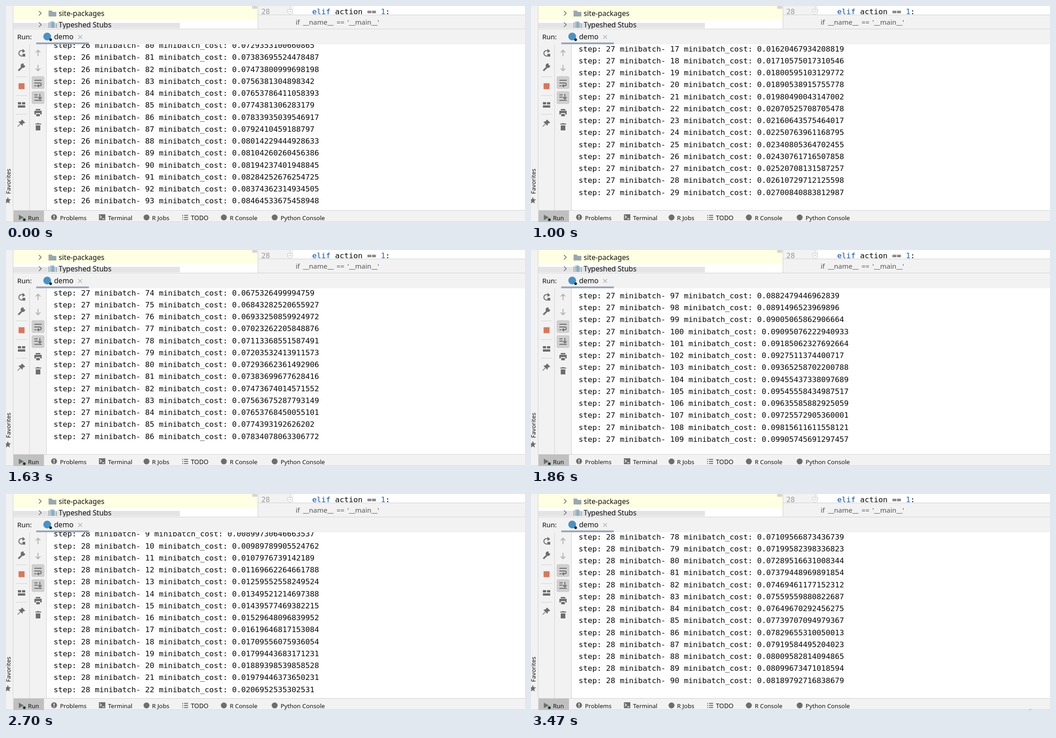
Recreate the animation shown at these times as an HTML page. Size 1134 by 474 pixels, loop 3.64 s.

```html
<!DOCTYPE html>
<html lang="en">
<head>
<meta charset="utf-8">
<title>Run console</title>
<style>
html, body { margin: 0; width: 100%; height: 100%; overflow: hidden; background: #f2f2f2; }
svg { display: block; }
text { font-family: "Noto Sans", "Open Sans", sans-serif; font-size: 15.65px; fill: #111; }
.mono text, text.mono { font-family: "DejaVu Sans Mono", monospace; font-size: 16.61px; fill: #080808; }
.small text { font-size: 13px; }
.line { fill: none; stroke: #6e6e6e; stroke-width: 2; }
.rule { stroke: #d1d1d1; fill: none; }
.icon { fill: #6e6e6e; }
</style>
</head>
<body>
<svg width="1134" height="474" viewBox="0 0 1134 474">
  <defs><clipPath id="pane"><rect x="89" y="84" width="1045" height="364"/></clipPath></defs>
  <rect width="1134" height="474" fill="#f2f2f2"/>

  <!-- project tree -->
  <rect x="16" width="534" height="50" fill="#fff"/>
  <rect x="16" width="534" height="31" fill="#ffffe4"/>
  <rect x="16" y="37" width="364" height="12" fill="#e4e4e4"/>
  <rect x="538" y="-4" width="11" height="10" fill="#d6d6d0"/>
  <path class="line" d="M72 11l5 5-5 5M72 36l5 5-5 5" style="stroke-width:1.6"/>
  <path fill="#9aa7b0" d="M93 10h7l2 3h8v10H93z"/>
  <path fill="#9aa7b0" d="M93 36h2v12h-2zM97 34h3v14h-3zM105 36h2v12h-2zM109 38h2v10h-2z"/>
  <path fill="#5a9fc4" d="M101 34h3v14h-3z"/>
  <text x="115" y="22">site-packages</text>
  <text x="115" y="47">Typeshed Stubs</text>

  <!-- editor -->
  <rect x="627" width="507" height="20" fill="#fff"/>
  <path class="rule" d="M550.5 0V50M620.5 0V20M551 19.5H1134"/>
  <path fill="#fff" stroke="#c4c4c4" d="M615.5 7.5h10v7l-5 4-5-4z"/>
  <path stroke="#aaa" d="M618 12.5h5"/>
  <text class="mono" x="558" y="18" style="fill:#999;font-size:15.5px">28</text>
  <text class="mono" x="669" y="18"><tspan fill="#0b4fae">elif</tspan> action == <tspan fill="#1763d6">1</tspan>:</text>
  <text x="633" y="41" style="fill:#555;font-size:15px;word-spacing:2.8px">if __name__ == '__main__'</text>

  <!-- run header -->
  <path class="rule" d="M16 50.5H1134"/>
  <text x="24.5" y="73" style="font-size:15px">Run:</text>
  <circle cx="90" cy="67" r="8.5" fill="#4b92c4"/>
  <circle cx="97.5" cy="74" r="3" fill="#17301c"/>
  <text x="105" y="73">demo</text>
  <path stroke="#aaa" stroke-width="1.3" d="M158 64l8 8M166 64l-8 8"/>
  <rect x="66" y="80" width="115" height="4" fill="#9ca7b8"/>

  <!-- console -->
  <rect x="89" y="84" width="1045" height="364" fill="#fff"/>
  <g id="log" class="mono" clip-path="url(#pane)"></g>

  <!-- tool buttons -->
  <path class="rule" d="M15.5 0V448M51.5 84V448M88.5 84V448M22 155.5h24M22 196.5h24M22 237.5h24"/>
  <path class="line" d="M36 109.5a6 6 0 1 1 1-11"/>
  <path class="icon" d="M36 94l6 5-6 4zM36 105h6v6h-6z"/>
  <path class="line" style="stroke-width:3.6" d="M27 142l8-8"/>
  <path class="icon" d="M38 126l1 4 3 1a5 5 0 1 1-4-5z"/>
  <rect x="27.5" y="169.5" width="13" height="13" fill="#d9775a"/>
  <path class="icon" d="M26 211h7v5h-7zM35 211h7v5h-7zM26 218h16v5H26z"/>
  <path class="icon" d="M35 249l7 7-2 1-3 1-1 5-4-4-6 6-1-1 6-6-4-4 5-1z"/>
  <path class="line" style="stroke:#b2b2b2" d="M70 110V97M65 102l5-5 5 5M70 129v13M65 137l5 5 5-5"/>
  <rect x="56" y="154" width="28" height="28" rx="4" fill="#cfcfcf"/>
  <rect x="56" y="187" width="28" height="28" rx="4" fill="#cfcfcf"/>
  <path class="line" d="M62 163h16M62 169h12a3 3 0 0 1 0 6h-4M62 175h4"/>
  <path class="icon" d="M72 171v8l-5-4z"/>
  <path class="line" d="M62 195h7M62 200h7M62 207h16M74 193v10M70 200l4 4 4-4"/>
  <path class="icon" d="M65 226h10v3H65zM62 230h16v8h-3v-3H65v3h-3zM66 237h8v5h-8z"/>
  <path class="icon" d="M68 257h4v1h5v2H64v-2h4zM65 262h10v11H65z"/>

  <!-- side and bottom bars -->
  <g class="small">
    <text transform="translate(9.5 412.5) rotate(-90)">Favorites</text>
    <path class="icon" d="M4 419l2 5 5 .5-4 3.5 1.5 5.5L4 430.5l-4.5 3L1 428l-4-3.5 5-.5z"/>
    <path class="rule" d="M16 448.5H1134M0 473.5H1134"/>
    <rect x="16" y="449" width="67" height="25" fill="#c0c0c0"/>
    <path class="icon" d="M28 458l11 6-11 6z"/>
    <circle cx="40" cy="469" r="3" fill="#16391d"/>
    <text x="48" y="470">Run</text>
    <circle class="icon" cx="105" cy="463.5" r="6.5"/>
    <path stroke="#fff" stroke-width="2" d="M105 459.5v5M105 466v2"/>
    <text x="118" y="470">Problems</text>
    <rect class="icon" x="203" y="457" width="14" height="13"/>
    <path fill="none" stroke="#fff" stroke-width="1.5" d="M205 460l3.5 3-3.5 3M210 467h5"/>
    <text x="223" y="470">Terminal</text>
    <circle class="icon" cx="307" cy="464" r="6.5"/>
    <text x="319" y="470" style="font-size:13.3px">R Jobs</text>
    <path class="line" d="M385 459.5h2M385 464h2M385 468.5h2M389 459.5h9M389 464h9M389 468.5h9"/>
    <text x="404" y="470" style="font-size:13.6px">TODO</text>
    <circle class="icon" cx="476" cy="464" r="6.5"/>
    <text x="489" y="470">R Console</text>
    <circle class="icon" cx="587" cy="464" r="6.5"/>
    <text x="600" y="470" style="font-size:13.2px">Python Console</text>
  </g>
  <ellipse id="spot" cx="1091" cy="474.5" rx="5" ry="2.5" fill="#f0c04a"/>
</svg>
<script>
const LOOP = 3640, TICK = 77.2, LEAD = 11, LAST_TICK = 45;
const PITCH = 26.25, BATCHES = 150, FIRST_STEP = 26;

// Ticks on which the console does not repaint
const held = [2, 8, 9, 12, 15, 20, 28, 31, 32];

// [tick, last printed line, scroll still to do]
const anchors = [[0, 94, 45], [7, 140, 0], [17, 205, 0], [24, 259, 6.25],
  [30, 290, 0], [39, 348, 20], [LAST_TICK, 390, 0]];

function lineText(n) {
  const batch = n % BATCHES, s = Math.floor(n / BATCHES);
  // Mean cost per batch drifts up within a step and drops after the second step
  const mean = 9.002e-4 + 3e-9 * batch - 2.5e-7 * s * (s - 1);
  const cost = (batch + 1) * mean + 1e-6 * Math.sin(n * 7.3);
  return `step: ${FIRST_STEP + s} minibatch- ${batch} minibatch_cost: ${+cost.toFixed(17)}`;
}

function tickAt(t) {
  let k = Math.min(LAST_TICK, Math.floor((t + LEAD) / TICK));
  while (held.includes(k)) k--;
  return k;
}

function consoleAt(k) {
  const i = anchors.findLastIndex(a => a[0] <= k);
  const [k0, last, scroll] = anchors[i];
  if (k === k0) return [last, scroll];
  const [k1, next] = anchors[i + 1];
  return [Math.round(last + (next - last) * (k - k0) / (k1 - k0)), k % 4 === 3 ? 20 : 0];
}

const log = document.getElementById('log'), spot = document.getElementById('spot');
const rows = Array.from({ length: 16 }, () => {
  const row = document.createElementNS(log.namespaceURI, 'text');
  row.setAttribute('x', 104);
  return log.appendChild(row);
});

let shown = -1;
function draw() {
  const k = tickAt(performance.now() % LOOP);
  if (k !== shown) {
    shown = k;
    const [last, scroll] = consoleAt(k);
    rows.forEach((row, r) => {
      row.textContent = lineText(last - r);
      row.setAttribute('y', Math.floor(415 + scroll - r * PITCH));
    });
    spot.style.display = k === LAST_TICK ? '' : 'none';
  }
  requestAnimationFrame(draw);
}
draw();
</script>
</body>
</html>
```
